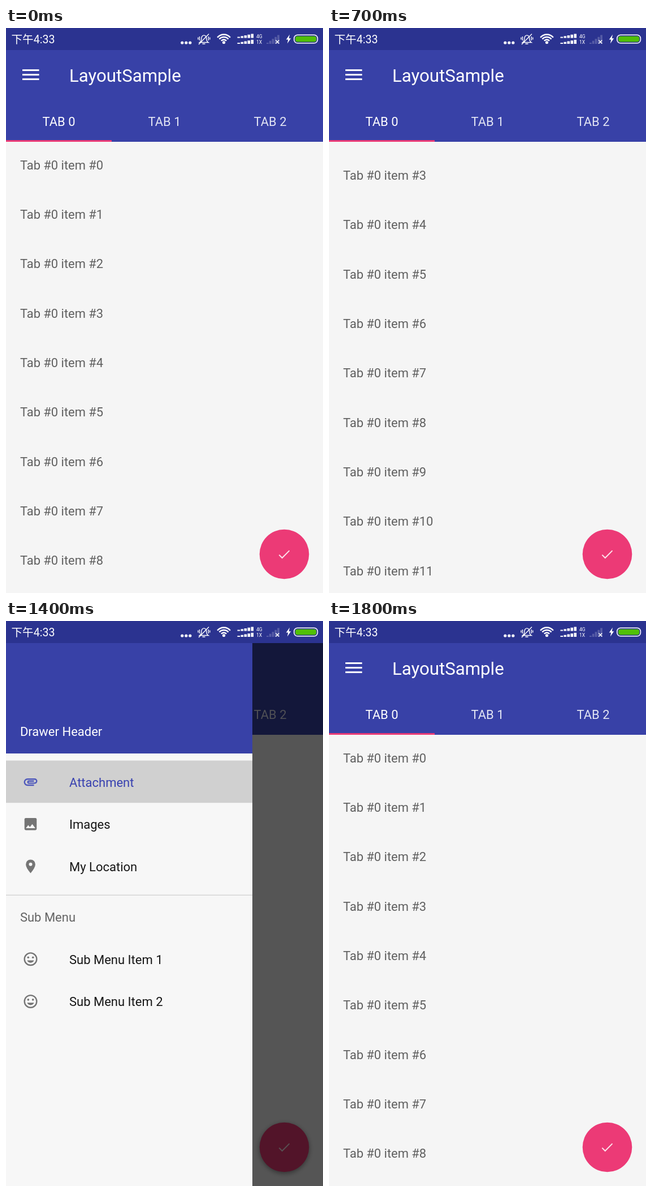
Write an HTML page that moves like this. It is 561 by 998 pixels and loops after 2 s.

```html
<!DOCTYPE html>
<html lang="en">
<head>
<meta charset="utf-8">
<title>Tabs and drawer</title>
<style>
  html, body { margin: 0; width: 100%; height: 100%; overflow: hidden; background: #f5f5f5; }
  svg { display: block; width: 561px; height: 998px; }
  text { font-family: Roboto, "Noto Sans CJK SC", "Noto Sans CJK", sans-serif; font-size: 21.9px; }
  .primary { fill: #3841a7; }
  .pink { fill: #ec3a76; }
  .white { fill: #fff; }
  .line { fill: none; stroke: #fff; }
  .title { font-size: 31.2px; }
  .clock { font-size: 19.6px; }
  .tiny { font-size: 8.5px; }
  #rows { fill: #606060; }
  #tabs { text-anchor: middle; fill: #e3e5f4; }
  #tabs :first-child { fill: #fff; }
  #drawer text { font-size: 22px; }
  #menu { fill: #161616; color: #757575; }
  #menu > :first-child { fill: #3841b0; color: #4f59bb; }
  .icon { fill: currentColor; stroke: none; }
  .icon .stroke { fill: none; stroke: currentColor; stroke-width: 2; }
  .icon .hole { fill: #f7f7f7; }
</style>
</head>
<body>
<svg viewBox="0 0 561 998">
  <defs>
    <filter id="soft" x="-30%" y="-30%" width="160%" height="160%"><feGaussianBlur stdDeviation="4"/></filter>
  </defs>
  <rect width="561" height="998" fill="#f5f5f5"/>
  <g id="rows"></g>

  <g id="bar">
    <rect class="primary" y="30" width="561" height="171"/>
    <rect id="press" y="39" width="87" height="87" fill="#fff" opacity=".14"/>
    <path class="line" stroke-width="3" d="M29 74.5h29.5m-29.5 8h29.5m-29.5 8h29.5"/>
    <text class="white title" x="112" y="95.4">LayoutSample</text>
    <g id="tabs"></g>
    <rect class="pink" y="198" width="187" height="3"/>
  </g>

  <circle id="shade" cx="492.5" cy="932" r="44" opacity=".4" filter="url(#soft)"/>
  <circle class="pink" cx="492.5" cy="929.5" r="43.8"/>
  <path class="line" stroke-width="2" opacity=".85" d="M483.3 930.6l5.4 5.4 12.8-12.9"/>

  <rect id="scrim" y="39" width="561" height="959"/>

  <g id="drawer">
    <rect y="39" width="436" height="959" fill="#f7f7f7"/>
    <rect class="primary" y="39" width="436" height="195"/>
    <text class="white" x="24.9" y="202.8">Drawer Header</text>
    <rect y="246.5" width="436" height="74.7" fill="#d0d0d0"/>
    <rect y="483.5" width="436" height="1.5" fill="#d6d6d6"/>
    <text x="24.9" y="531" fill="#646464">Sub Menu</text>
    <g id="menu"></g>
  </g>

  <rect width="561" height="39" fill="#2b3390"/>
  <text class="white clock" x="9.5" y="27.4">下午4:33</text>
  <g id="status" class="white">
    <path class="line" stroke-width="1.4" d="M342.5 25.5q3.4-2 3.4-7a4.4 5.6 0 0 1 8.8 0q0 5 3.4 7zM347.5 28h5M341 29L359 10.5M342.5 15v7m-2.5-5.5v4M358.2 15v7m2.5-5.5v4"/>
    <circle cx="385.5" cy="25.5" r="2.6"/>
    <text class="tiny" x="443" y="18">4G</text>
    <text class="tiny" x="443" y="28">1X</text>
    <path class="line" stroke-width="1.5" d="M477.3 21.5l6 6m0-6l-6 6"/>
    <path d="M502 11.5l-6.3 9h3.6l-1.5 7 6.4-9.2h-3.6z"/>
    <rect class="line" x="509.8" y="12.3" width="41.6" height="14.4" rx="6" stroke-width="1.6"/>
    <rect x="512" y="14.4" width="37.2" height="10.2" rx="4" fill="#50bf08"/>
  </g>
</svg>
<script>
  const LOOP = 2000, FRAME = 100;
  const TOOLBAR = 87.5, TRAVEL = 425, OPEN = 436;

  // Icons on a 24 unit grid
  const ICONS = {
    clip: `<path class="stroke" d="M17 17H7.5a4.5 4.5 0 0 1 0-9H18a3 3 0 0 1 0 6H9.5a1.5 1.5 0 0 1 0-3H17"/>`,
    image: `<rect x="3" y="3" width="18" height="18" rx="2"/><path class="hole" d="M5 18l3.5-4.5 2.5 3 3.5-4.5 4.5 6z"/>`,
    pin: `<path d="M5 9a7 7 0 0 1 14 0q0 5-7 13-7-8-7-13"/><circle class="hole" cx="12" cy="9" r="2.5"/>`,
    smile: `<circle class="stroke" cx="12" cy="12" r="9"/><circle cx="8.5" cy="9.5" r="1.5"/><circle cx="15.5" cy="9.5" r="1.5"/><path d="M6.9 14a5.5 5.5 0 0 0 10.2 0z"/>`
  };

  const $ = id => document.getElementById(id);
  const add = (id, markup) => $(id).insertAdjacentHTML("beforeend", markup);
  const repeat = (count, make) => Array.from({ length: count }, (_, i) => make(i)).join("");

  add("rows", repeat(20, i => `<text x="24.9" y="${249.6 + 87.33 * i}">Tab #0 item #${i}</text>`));
  add("tabs", repeat(3, i => `<text x="${93.5 + 187 * i}" y="172.6">TAB ${i}</text>`));

  function menuItem(icon, label, y) {
    add("menu", `<g transform="translate(0 ${y})">
      <g class="icon" transform="translate(43.5 -.5) scale(1.2) translate(-12 -12)">${ICONS[icon]}</g>
      <text x="112" y="8">${label}</text></g>`);
  }
  ["clip Attachment", "image Images", "pin My Location"].forEach((entry, i) => {
    const [icon, ...label] = entry.split(" ");
    menuItem(icon, label.join(" "), 284.5 + 74.7 * i);
  });
  for (const i of [0, 1]) menuItem("smile", `Sub Menu Item ${i + 1}`, 597.7 + 74.7 * i);

  const signal = (x, base, pitch, rise) => repeat(5, i => {
    const height = 2 + rise * i;
    return `<rect x="${x + pitch * i}" y="${base - height}" width="${pitch * 0.76}" height="${height}"/>`;
  });
  const wave = r =>
    `<path class="line" stroke-width="2.5" d="M${385.5 - 0.76 * r} ${26.5 - 0.65 * r}a${r} ${r} 0 0 1 ${1.52 * r} 0"/>`;

  add("status", repeat(3, i => `<circle cx="${311.8 + 7 * i}" cy="26" r="2.6"/>`));
  add("status", repeat(3, i => wave(6 + 4.5 * i)));
  add("status", signal(409.5, 17.6, 6, 1.3) + signal(409.5, 28, 6, 1.3));
  add("status", `<g opacity=".2">${signal(461, 28, 4.8, 3.4)}</g>`);

  const progress = (time, from, to) => Math.min(1, Math.max(0, (time - from) / (to - from)));
  const easeOut = (u, power) => 1 - (1 - u) ** power;

  function draw(now) {
    const time = Math.floor(now % LOOP / FRAME) * FRAME;

    // The toolbar takes the first part of each swipe, the list the rest
    const up = TRAVEL * easeOut(progress(time, 100, 500), 1.42);
    const down = TRAVEL * progress(time, 500, 800) ** 2.1;
    const hidden = Math.max(0, Math.min(TOOLBAR, up) - down);

    const opening = easeOut(progress(time, 1000, 1200), 4);
    const closing = easeOut(progress(time, 1400, 1600), 4);
    const shown = opening - closing;

    $("bar").setAttribute("transform", `translate(0 ${-hidden})`);
    $("rows").setAttribute("transform", `translate(0 ${down - up})`);
    $("drawer").setAttribute("transform", `translate(${OPEN * (shown - 1)} 0)`);
    $("scrim").setAttribute("opacity", 0.65 * shown);
    $("shade").style.display = shown ? "" : "none";
    $("press").style.display = time === 1000 ? "" : "none";
  }

  const start = performance.now();
  function tick() {
    draw(Math.max(0, performance.now() - start));
    requestAnimationFrame(tick);
  }
  tick();
</script>
</body>
</html>
```
